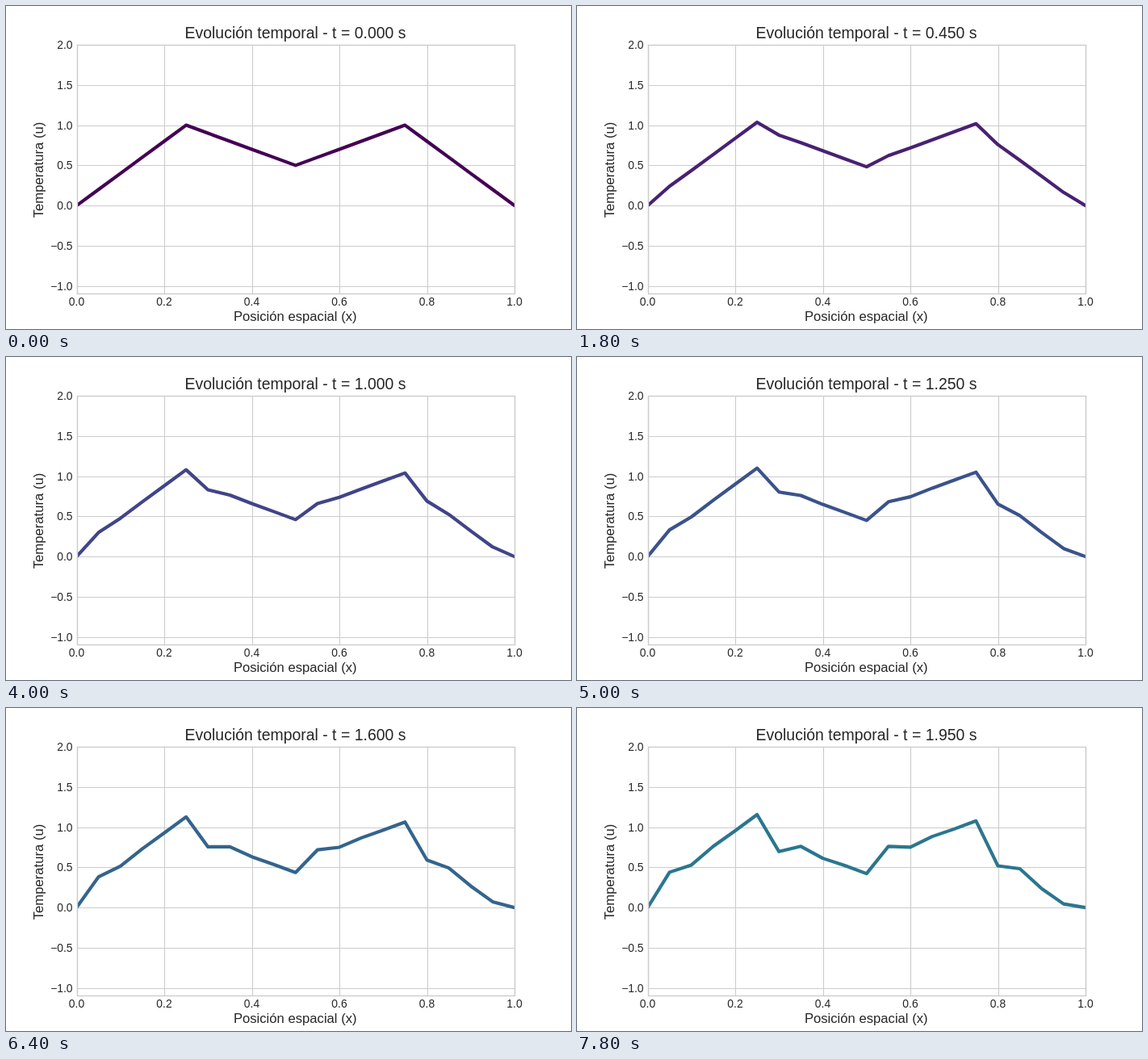
An HTML page for the animation above (8 s loop, 700 px wide and 400 px high).

```html
<!DOCTYPE html>
<html lang="es">
<head>
<meta charset="utf-8">
<title>Evolución temporal</title>
<style>
  html, body { margin: 0; width: 100%; height: 100%; overflow: hidden; background: #fff; }
  svg { display: block; width: 700px; height: 400px; }
  text { font-family: "Liberation Sans", Arial, sans-serif; fill: #262626; text-anchor: middle; white-space: pre; }
  .title { font-size: 19.44px; }
  .label { font-size: 16.67px; }
  .tick { font-size: 13.89px; }
  .tick.y { text-anchor: end; }
  .grid { stroke: #ccc; stroke-width: 1.11; }
  .frame { fill: none; stroke: #ccc; stroke-width: 1.39; }
  #curve { fill: none; stroke-width: 4.17; stroke-linejoin: round; stroke-linecap: round; }
</style>
</head>
<body>
<svg viewBox="0 0 700 400">
  <clipPath id="plot"><rect x="88" y="48" width="542" height="308"/></clipPath>
  <g id="axes"></g>
  <polyline id="curve" clip-path="url(#plot)"/>
  <rect class="frame" x="88.5" y="48.5" width="542" height="308"/>
  <text class="title" id="title" x="358.5" y="40"></text>
  <text class="label" x="358.25" y="390">Posición espacial (x)</text>
  <text class="label" transform="translate(46 203) rotate(-90)">Temperatura (u)</text>
</svg>
<script>
const STEP_MS = 200, STEPS = 40, DT = 0.05, CELLS = 20, SPEED = 0.02;
const U_MIN = -1.093, U_MAX = 2;
const VIRIDIS = ['440154', '471365', '482475', '463480', '414487', '3b528b', '355f8d', '2f6c8e', '2a788e']
  .map(hex => [0, 2, 4].map(i => parseInt(hex.slice(i, i + 2), 16)));

const axes = document.getElementById('axes');
const curve = document.getElementById('curve');
const title = document.getElementById('title');

const px = x => 87.5 + 542.5 * x;
const py = u => 48 + 308 * (U_MAX - u) / (U_MAX - U_MIN);
const snap = v => Math.floor(v + 0.5) + 0.5;

function add(tag, attrs, text = '') {
  const el = document.createElementNS('http://www.w3.org/2000/svg', tag);
  for (const name in attrs) el.setAttribute(name, attrs[name]);
  el.textContent = text;
  axes.append(el);
}

function drawAxes() {
  for (let i = 0; i <= 5; i++) {
    const x = px(i / 5);
    add('line', { class: 'grid', x1: snap(x), x2: snap(x), y1: 48, y2: 356 });
    add('text', { class: 'tick', x, y: 371 }, (i / 5).toFixed(1));
  }
  for (let u = -1; u <= 2; u += 0.5) {
    const y = snap(py(u));
    add('line', { class: 'grid', x1: 88, x2: 630, y1: y, y2: y });
    add('text', { class: 'tick y', x: 82.6, y: Math.round(py(u)) + 5 }, u.toFixed(1).replace('-', '\u2212'));
  }
}

// Two peaks of height 1 with a dip to 0.5 in the middle.
function initial(x) {
  const d = Math.min(x, 1 - x);
  return d < 0.25 ? 4 * d : 1.5 - 2 * d;
}

// Implicit advection step with backward difference and fixed ends.
function advance(u) {
  const k = SPEED * DT * CELLS;
  const next = [0];
  for (let i = 1; i < CELLS; i++) next[i] = (u[i] - k * next[i - 1]) / (1 - k);
  next[CELLS] = 0;
  return next;
}

const states = [Array.from({ length: CELLS + 1 }, (_, i) => initial(i / CELLS))];
while (states.length < STEPS) states.push(advance(states[states.length - 1]));

function color(n) {
  const pos = n / 5, i = Math.floor(pos), f = pos - i;
  const rgb = VIRIDIS[i].map((c, j) => Math.round(c + (VIRIDIS[i + 1][j] - c) * f));
  return `rgb(${rgb})`;
}

let shown = -1;
function render() {
  const n = Math.floor(performance.now() / STEP_MS) % STEPS;
  if (n !== shown) {
    shown = n;
    curve.setAttribute('points', states[n].map((u, i) => `${px(i / CELLS)},${py(u).toFixed(2)}`).join(' '));
    curve.style.stroke = color(n);
    title.textContent = `Evolución temporal - t = ${(n * DT).toFixed(3)} s`;
  }
  requestAnimationFrame(render);
}

drawAxes();
render();
</script>
</body>
</html>
```
